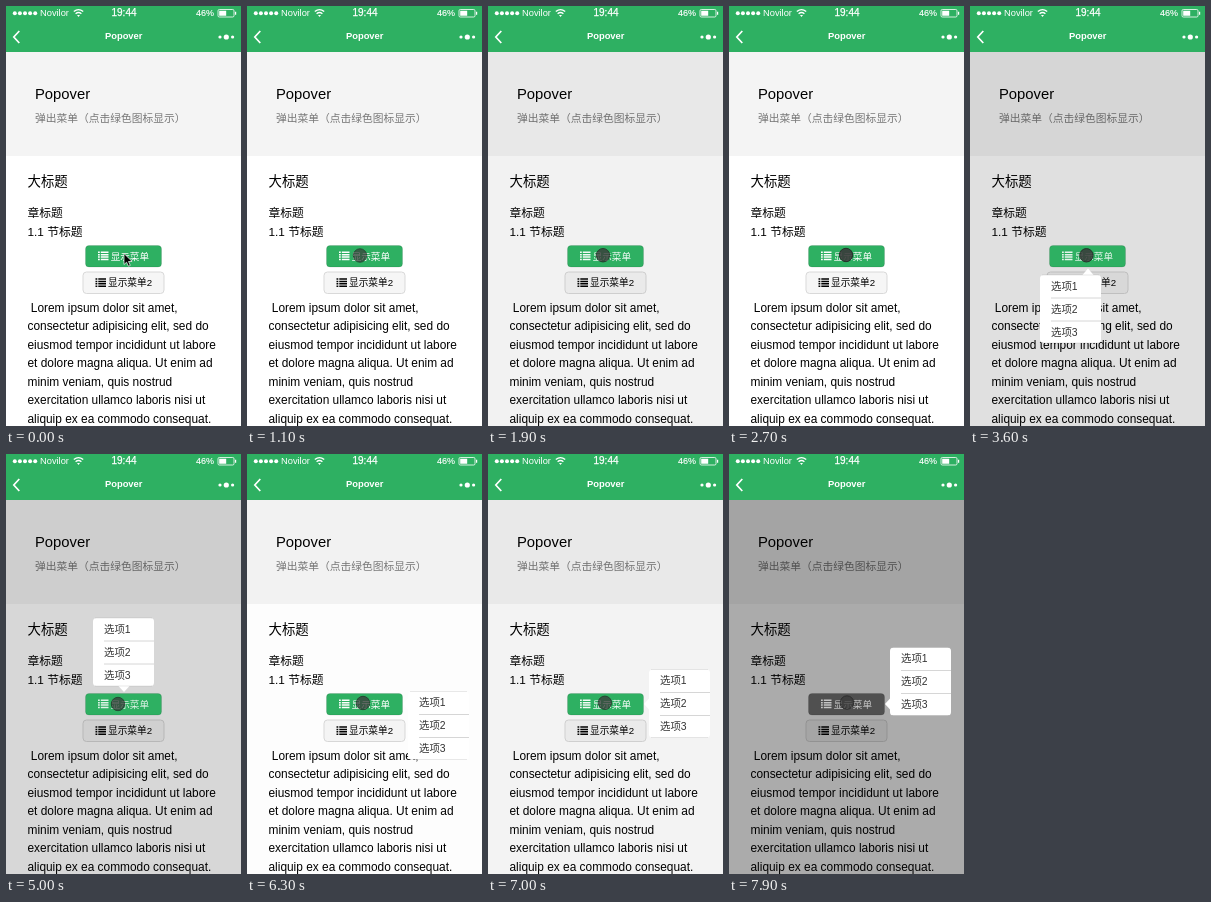
An HTML page that plays this animation: 235x420 px, repeating every 8000 ms.

```html
<!DOCTYPE html>
<html lang="zh">
<head>
<meta charset="utf-8">
<style>
  html, body { margin: 0; width: 100%; height: 100%; overflow: hidden; background: #fff; }
  svg { display: block; width: 100vw; height: 100vh; }
  text { font-family: "Liberation Sans", "Noto Sans CJK SC", "Noto Sans CJK", sans-serif; fill: #000; white-space: pre; }
  .light text { fill: #fff; }
  #items text { fill: #333; }
</style>
</head>
<body>
<svg viewBox="0 0 235 420">
  <defs>
    <path id="list" d="M0 1h1.8M0 3.4h1.8M0 5.8h1.8M0 8.2h1.8M2.8 1h7.7M2.8 3.4h7.7M2.8 5.8h7.7M2.8 8.2h7.7" stroke="currentColor" stroke-width="1.5"/>
  </defs>

  <rect width="235" height="420" fill="#fff"/>
  <rect y="46" width="235" height="104" fill="#f4f4f4"/>
  <text x="29" y="93.2" font-size="14.8">Popover</text>
  <text x="29" y="116" font-size="10.75" style="fill:#777">弹出菜单（点击绿色图标显示）</text>
  <text x="21.5" y="179.5" font-size="13.4">大标题</text>
  <text x="21.5" y="210.6" font-size="11.8">章标题</text>
  <text x="21.5" y="229.8" font-size="11.8">1.1 节标题</text>
  <g id="lorem" font-size="11.9"></g>

  <rect x="77" y="266" width="81" height="21.5" rx="3.5" fill="#f6f6f6" stroke="#d9d9d9"/>
  <use href="#list" x="89.5" y="272"/>
  <text x="102" y="280.3" font-size="9.7">显示菜单2</text>

  <rect id="mask" y="46" width="235" height="374" opacity="0"/>

  <rect id="button" x="79.5" y="239.5" width="76" height="21.5" rx="3.5" fill="#2eb062" stroke="#000" stroke-opacity=".1"/>
  <g id="label" class="light" color="#fff">
    <use href="#list" x="92" y="245.3"/>
    <text x="104.7" y="253.8" font-size="9.6">显示菜单</text>
  </g>

  <g id="popover">
    <path id="arrow" fill="#fff"/>
    <g id="panel" font-size="10.4">
      <rect width="61" height="68" rx="3.5" fill="#fff"/>
      <path d="M2 0h57M2 68h57" stroke="#000" stroke-opacity=".15" stroke-width=".6"/>
      <g id="items"></g>
    </g>
  </g>

  <g class="light">
    <rect width="235" height="46" fill="#2eb062"/>
    <g id="signal" fill="#fff"></g>
    <text x="34" y="10.3" font-size="9.3">Novilor</text>
    <g fill="none" stroke="#fff" stroke-width="1.3">
      <path d="M67.8 5.6q4.7-4 9.4 0M69.6 7.7q2.9-2.4 5.8 0"/>
      <path d="M13.3 25l-5.5 6 5.5 6" stroke-width="1.7"/>
      <rect x="212" y="3.5" width="16" height="7.5" rx="1.3" stroke-width=".8"/>
    </g>
    <path d="M71 9h3l-1.5 2zM213.2 4.7h7v5.1h-7zM229 5.8h1.2v3H229z" fill="#fff"/>
    <text x="118" y="10.4" font-size="10" text-anchor="middle" stroke="#fff" stroke-width=".25">19:44</text>
    <text x="190" y="10.3" font-size="9" stroke="#fff" stroke-width=".15">46%</text>
    <text x="117.7" y="33.4" font-size="9.4" font-weight="bold" text-anchor="middle">Popover</text>
    <g fill="#fff">
      <circle cx="214" cy="31" r="1.6"/>
      <circle cx="220.3" cy="31" r="2.6"/>
      <circle cx="226.6" cy="31" r="1.6"/>
    </g>
  </g>

  <path id="pointer" d="M118 247.5v11l2.6-2.3 1.8 4 1.9-.8-1.8-3.9h3.6z" fill="#000" stroke="#fff" stroke-width=".7"/>
  <circle id="touch" r="6.7" fill="#3a3a3a" stroke="#222"/>
</svg>

<script>
const $ = id => document.getElementById(id);
const set = (id, attrs) => {
  for (const name in attrs) $(id).setAttribute(name, attrs[name]);
};

$('signal').innerHTML = [0, 1, 2, 3, 4].map(i =>
  `<circle cx="${8.8 + i * 5.1}" cy="7.2" r="2"/>`).join('');

$('lorem').innerHTML = [
  ' Lorem ipsum dolor sit amet,',
  'consectetur adipisicing elit, sed do',
  'eiusmod tempor incididunt ut labore',
  'et dolore magna aliqua. Ut enim ad',
  'minim veniam, quis nostrud',
  'exercitation ullamco laboris nisi ut',
  'aliquip ex ea commodo consequat.'
].map((line, i) => `<text x="21.5" y="${305.8 + i * 18.45}">${line}</text>`).join('');

$('items').innerHTML = [0, 1, 2].map(i =>
  `<text x="11" y="${14.8 + i * 23}">选项${i + 1}</text>` +
  (i ? `<path d="M11 ${i * 23}h50" stroke="#ccc" stroke-width=".8"/>` : '')
).join('');

const LOOP = 8000, OPEN = 430, MAX_DIM = 0.34;
const arrows = {
  bottom: 'M112 269.5l6-7 6 7z',
  top: 'M112 231.5l6 6.5 6-6.5z',
  right: 'M161.5 244l-5.5 6 5.5 6z'
};

// opening time, side, left, top
const taps = [
  [1300, 'bottom', 87, 269],
  [2050, 'bottom', 105, 269],
  [2790, 'bottom', 87, 269],
  [3490, 'bottom', 70, 269],
  [4210, 'top', 105, 164],
  [4860, 'top', 87, 164],
  [5560, 'top', 70, 164],
  [6295, 'right', 161, 237.5],
  [6960, 'right', 161, 215.5],
  [7600, 'right', 161, 193.5]
];

// time, touch x, touch y, touch opacity
const path = [
  [900, 115, 250, .65], [1100, 113, 249.5, .7], [2700, 117, 249, .9],
  [4300, 116, 249.5, .85], [5000, 112, 250, .75], [6300, 116, 249, .75], [7900, 118, 248.5, .75]
];

function along(t) {
  const next = path.findIndex(p => p[0] > t);
  if (next < 1) return next ? path[path.length - 1] : path[0];
  const a = path[next - 1], b = path[next];
  const k = (t - a[0]) / (b[0] - a[0]);
  return a.map((v, i) => v + (b[i] - v) * k);
}

function draw(t) {
  const tap = taps.filter(p => p[0] <= t).pop();
  const age = tap ? t - tap[0] : Infinity;
  const isOpen = age < OPEN;
  const dim = isOpen
    ? Math.min(MAX_DIM, age * 0.0011)
    : Math.max(0, MAX_DIM * (1 - (age - OPEN) / 200));

  set('mask', { opacity: dim });
  set('button', { fill: dim > 0.25 ? '#505050' : '#2eb062' });
  set('label', { opacity: 1 - dim });
  set('popover', { visibility: isOpen ? 'visible' : 'hidden' });
  if (isOpen) {
    const [, side, x, y] = tap;
    set('arrow', { d: arrows[side] });
    set('panel', { transform: `translate(${x} ${y})` });
  }

  const touching = t >= 900;
  const [, cx, cy, opacity] = along(t);
  set('pointer', { visibility: touching ? 'hidden' : 'visible' });
  set('touch', { cx, cy, opacity: touching ? opacity : 0 });
}

const start = performance.now();
function tick() {
  draw((performance.now() - start) % LOOP);
  requestAnimationFrame(tick);
}
tick();
</script>
</body>
</html>
```
